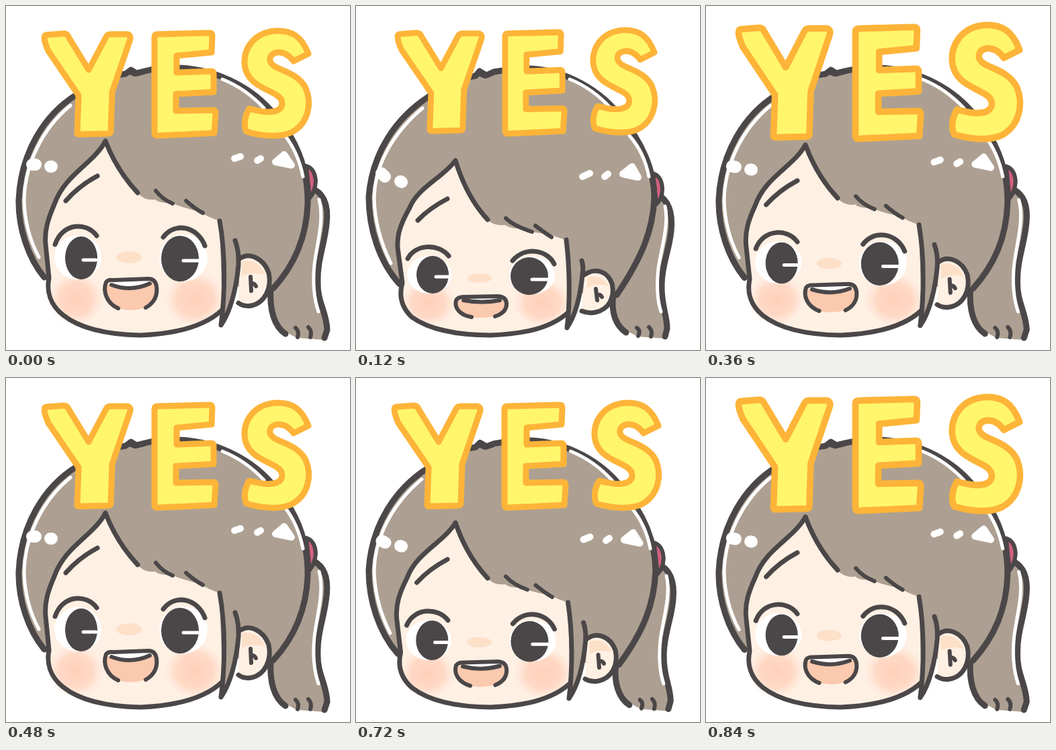
Recreate the animation shown at these times as an HTML page. Size 512 px wide and 512 px high, loop 960 ms.

```html
<!DOCTYPE html>
<html lang="en">
<head>
<meta charset="utf-8">
<title>YES</title>
<style>
  html, body { margin: 0; width: 100%; height: 100%; overflow: hidden; background: #fff; }
  svg { display: block; width: 100%; height: 100%; }
  path { fill: none; stroke: #4b4748; stroke-width: 7; stroke-linecap: round; stroke-linejoin: round; }
  .hair { fill: #ada092; }
  .skin { fill: #fff0e4; }
  .outer { stroke-width: 9; }
  .thin { stroke-width: 6; }
  .shine { stroke: #fff; stroke-width: 5; }
  .dot { stroke: #fff; stroke-width: 10; }
  .blob { fill: #fff; stroke: #fff; stroke-width: 10; }
  .spot { stroke: #fff; stroke-width: 18; }
  .tie { fill: #d2607f; stroke-width: 6; }
  .flat { stroke: none; }
  .white { fill: #fff; stroke: none; }
  .iris { fill: #4b4748; stroke: none; }
  .nose { fill: #fde0c8; stroke: none; }
  .tongue { fill: #fbc9ae; stroke: none; }
  .blush { fill: url(#blush); stroke: none; }
  .letter { fill: #fff66c; stroke: #fdb438; stroke-width: 9; }
  .pose { visibility: hidden; animation: show 480ms step-end infinite; }
  @keyframes show { 0% { visibility: visible; } 25%, 100% { visibility: hidden; } }
</style>
</head>
<body>
<svg id="stage" viewBox="0 0 512 512" role="img" aria-label="YES">
  <defs>
    <radialGradient id="blush">
      <stop offset="0" stop-color="#ffd0ba"/>
      <stop offset=".6" stop-color="#ffd5c1" stop-opacity=".85"/>
      <stop offset="1" stop-color="#ffe2d2" stop-opacity="0"/>
    </radialGradient>
  </defs>
</svg>
<script>
// Each part is [class, raised shape, lowered shape]; poses blend between the two.
const oval = (x, y, rx, ry) =>
  `M${x - rx} ${y}a${rx} ${ry} 0 1 0 ${2 * rx} 0a${rx} ${ry} 0 1 0 ${-2 * rx} 0z`;

const back = [
  ['hair flat',
    'M452 270C470 276 481 292 477 325C474 355 463 380 464 410C463 440 477 455 478 482L474 497L434 494C402 482 392 452 394 420Z',
    'M448 280C464 288 472 305 469 335C466 365 455 385 455 415C454 445 463 460 463 480L460 495L420 492C390 480 380 456 383 430Z'],
  ['outer',
    'M452 270C470 276 481 292 477 325C474 355 463 380 464 410C463 440 477 455 478 482L474 494',
    'M448 280C464 288 472 305 469 335C466 365 455 385 455 415C454 445 463 460 463 480L460 492'],
  ['outer', 'M394 420C392 452 399 477 416 488', 'M383 430C379 456 387 476 402 486'],
  ['shine',
    'M466 288C474 318 463 352 459 385C456 415 459 437 465 455',
    'M460 298C466 325 455 358 450 390C447 418 448 437 454 455'],
  ['thin', 'M431 479Q437 484 434 493M450 478Q456 484 453 493', 'M418 479Q424 483 420 491M436 478Q442 483 439 492'],
  ['tie', 'M447 238Q460 242 461 261Q460 276 452 286Z', 'M442 249Q455 253 456 272Q456 287 447 295Z'],
  ['hair outer',
    'M57 404C33 375 18 330 19 288C22 220 56 162 105 132C130 113 150 104 178 101L186 95L194 100L206 97C225 92 245 91 258 92C320 95 371 126 399 161C434 200 450 245 449 295C447 345 430 385 398 420',
    'M65 414C34 380 19 330 19 284C24 218 60 166 108 135C130 117 150 108 178 104L184 97L194 103L205 98C225 95 245 92 258 93C313 95 366 127 393 164C426 202 444 245 444 285C442 335 425 375 388 430'],
  ['thin', 'M181 98L192 102L205 99', 'M181 100L192 105L203 101'],
  ['shine',
    'M96 148C54 182 28 236 27 289Q28 335 49 374M322 109Q357 123 384 152M414 191Q435 218 442 254',
    'M99 152C56 188 28 236 27 285Q28 335 52 383M318 109Q353 123 380 153M407 193Q429 218 436 254']
];

const contour = [
  'M148 201C130 235 88 250 72 295C62 318 57 335 59 355L64 405C60 425 66 445 85 460C110 480 150 489 200 490C250 488 295 478 322 452',
  'M148 230C130 255 92 270 80 300C66 325 61 340 62 360L69 412C64 430 67 448 83 463C108 481 150 490 200 490C250 488 290 480 317 455'
];
const fringe = [
  'L318 320Q300 314 288 306Q262 300 246 293Q228 294 222 288Q205 290 196 278Q165 245 148 201Z',
  'L313 348Q300 345 290 340Q265 338 246 331Q230 332 222 326Q205 328 196 318Q165 285 148 230Z'
];

const face = [
  ['skin flat', contour[0] + fringe[0], contour[1] + fringe[1]],
  ['blush', oval(104, 436, 42, 40), oval(108, 442, 42, 36)],
  ['blush', oval(281, 436, 46, 42), oval(277, 442, 44, 37)],
  ['', ...contour],
  ['', 'M148 201Q165 245 196 278', 'M148 230Q165 285 196 318']
];

const features = [
  ['white', oval(107, 374, 35, 33), oval(109, 400, 33, 28)],
  ['white', oval(264, 375, 36, 35), oval(262, 401, 34, 28)],
  ['iris', oval(112, 375, 24, 32), oval(114, 400, 24, 28)],
  ['iris', oval(259, 376, 28, 34), oval(258, 402, 28, 28)],
  ['shine', 'M115 378L134 378M264 379L287 379', 'M119 403L138 403M262 407L286 407'],
  ['', 'M73 355C84 322 120 321 135 342M234 344C252 320 286 329 296 357', 'M77 376C88 354 123 353 138 372M233 379C252 357 285 363 295 384'],
  ['nose', oval(183, 374, 19, 9), oval(184, 405, 18, 7)],
  ['tongue', 'M150 414Q185 422 222 412Q228 440 207 449Q185 456 165 449Q146 435 150 414Z', 'M151 438Q187 442 222 438Q227 455 206 462Q185 466 167 462Q149 452 151 438Z'],
  ['white', 'M153 408L216 406Q211 421 186 421Q160 421 153 408Z', 'M155 434L218 434Q211 442 187 442Q160 442 155 434Z'],
  ['thin', 'M157 415Q186 426 214 413', 'M160 438Q187 443 214 438'],
  ['thin', 'M167 450C149 442 144 424 149 411Q152 407 160 408L212 406Q222 406 224 417Q227 438 208 449', 'M172 463C154 460 146 449 149 438Q152 433 160 433L212 432Q223 433 224 442Q225 456 207 462']
];

const front = [
  ['', 'M89 290Q108 268 136 253', 'M92 319Q109 301 136 287'],
  ['thin', 'M223 275Q233 288 248 294M268 290Q280 301 293 308', 'M223 316Q236 328 262 336M267 327Q280 337 291 344'],
  ['skin',
    'M348 376C362 366 383 375 391 397C396 420 385 442 365 446Q354 448 346 442',
    'M340 400C355 389 374 394 381 413C386 434 376 452 356 456Q346 458 336 454'],
  ['nose', 'M351 380Q374 374 386 400Q368 394 351 402Z', 'M344 404Q366 398 376 417Q360 411 344 420Z'],
  ['thin', 'M364 403L365 424M365 414Q369 411 372 417', 'M357 421L359 438M359 431Q363 428 366 433'],
  ['hair',
    'M318 320C327 370 326 430 320 475C334 455 343 420 346 385Q347 365 341 349',
    'M313 348C318 390 319 440 314 479C327 460 334 430 337 400Q339 388 336 379'],
  ['dot', 'M340 227L349 224M374 230L379 227', 'M337 254L348 249M370 254L375 250'],
  ['blob', 'M401 232L414 221L425 237Z', 'M397 250L411 239L420 255Z'],
  ['spot', 'M39 236L44 236M66 239L68 239', 'M38 249L43 254M66 261L68 262']
];

// Letter outlines with their painted bounds: left, top, right, bottom.
const letters = [
  { box: [52, 37, 190, 196], d: 'M60 43L86 41Q91 41 93 46L123 95L149 46Q151 42 156 42L181 42Q187 44 184 52L158 128L156 187Q156 190 152 190L109 191Q105 191 106 187L108 133L63 67Q53 44 60 43Z' },
  { box: [216, 36, 316, 197], d: 'M225 42L303 40Q307 40 307 44L306 69L254 74L254 99L306 97Q309 97 309 101L309 128L253 131L253 156L309 155Q312 155 312 159L310 189L225 193Q221 193 221 189L221 46Q221 42 225 42Z' },
  { box: [351, 32, 455, 197], d: 'M450 71C440 45 425 36 402 37C370 39 354 62 355 86C357 115 385 122 402 132C415 140 414 154 398 157C385 159 375 156 362 153C354 165 354 180 358 187C385 195 410 195 425 188C450 175 456 145 446 122C436 102 412 97 400 90C388 82 392 71 404 69C414 68 422 74 428 82Z' }
];
const plain = letters.map(l => l.box);
const small = [[57, 36, 192, 191], [217, 35, 314, 194], [349, 31, 449, 192]];
const large = [[43, 28, 190, 201], [217, 27, 324, 202], [362, 23, 472, 202]];

function blend(a, b, t) {
  const ends = b.match(/-?[\d.]+/g);
  let i = 0;
  return a.replace(/-?[\d.]+/g, n => +(+n + (ends[i++] - n) * t).toFixed(2));
}

const draw = (parts, t) =>
  parts.map(([name, a, b]) => `<path class="${name}" d="${blend(a, b, t)}"/>`).join('');

function drawLetter({ box, d }, to) {
  const sx = (to[2] - to[0]) / (box[2] - box[0]);
  const sy = (to[3] - to[1]) / (box[3] - box[1]);
  const matrix = [sx, 0, 0, sy, to[0] - box[0] * sx, to[1] - box[1] * sy];
  return `<path class="letter" d="${d}" transform="matrix(${matrix})"/>`;
}

const poses = [
  { body: 0, hair: 0, face: 0, text: plain },
  { body: 1, hair: 1, face: 1, text: small },
  { body: 0.65, hair: 0.5, face: 0.62, text: plain },
  { body: 0.05, hair: 0.2, face: 0.3, text: large }
];

document.getElementById('stage').insertAdjacentHTML('beforeend', poses.map((p, i) =>
  `<g class="pose" style="animation-delay:${(i - poses.length) * 120}ms">` +
  draw(back, p.body) + draw(face, p.hair) + draw(features, p.face) + draw(front, p.hair) +
  letters.map((l, k) => drawLetter(l, p.text[k])).join('') + '</g>'
).join(''));
</script>
</body>
</html>
```
